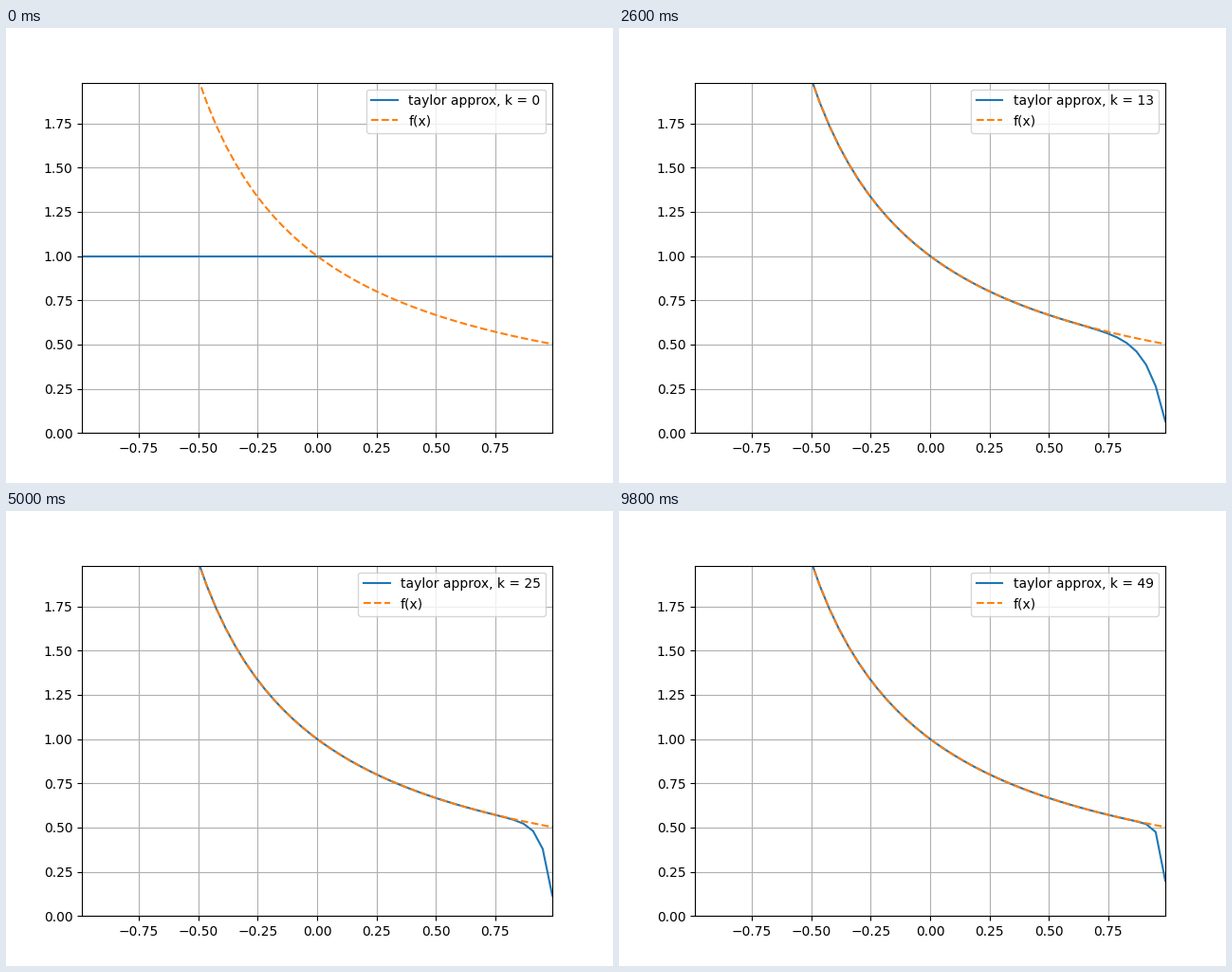
A matplotlib script that plays this animation: 640 by 480 pixels, repeating every 10000 ms.

```python
import numpy as np
import matplotlib.pyplot as plt
from matplotlib.animation import FuncAnimation

FRAMES = 50
INTERVAL = 200
LIMIT = 0.99

plt.rcParams["font.family"] = "DejaVu Sans"

x = np.linspace(-LIMIT, LIMIT, 50)


def taylor(k):
    """Taylor polynomial of degree k for 1 / (1 + x) around zero."""
    return sum((-x) ** n for n in range(k + 1))


fig, ax = plt.subplots(figsize=(6.4, 4.8), dpi=100)
approx, = ax.plot(x, taylor(0), label="taylor approx, k = 0")
ax.plot(x, 1 / (1 + x), "--", label="f(x)")
ax.set_xlim(-LIMIT, LIMIT)
ax.set_ylim(0, 2 * LIMIT)
ax.grid(True)
legend = ax.legend(loc="upper right")
caption = legend.get_texts()[0]


def update(k):
    approx.set_ydata(taylor(k))
    caption.set_text(f"taylor approx, k = {k}")
    return approx, caption


anim = FuncAnimation(fig, update, frames=FRAMES, interval=INTERVAL,
                     init_func=lambda: update(0), repeat=True, repeat_delay=0)

plt.show()
```
